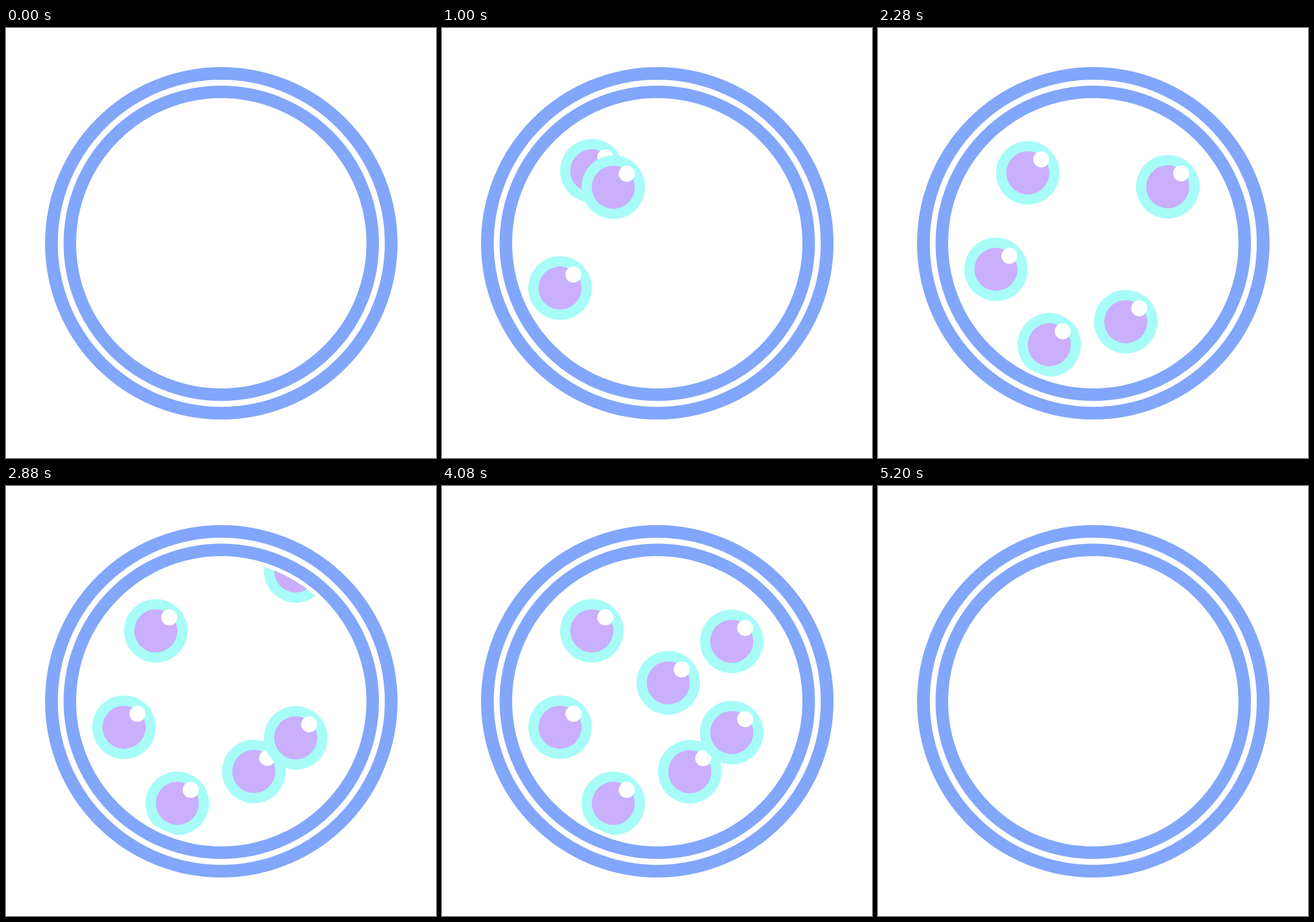
Animation, 748 px wide and 748 px high, one loop 5.6 s. Source, as an HTML page:

```html
<!DOCTYPE html>
<html lang="en">
<head>
<meta charset="utf-8">
<title>Bouncing bubbles</title>
<style>
  html, body { margin: 0; width: 100%; height: 100%; overflow: hidden; background: #fff; }
  svg { display: block; width: 100vw; height: 100vh; }
</style>
</head>
<body>
<svg viewBox="0 0 748 748">
  <defs>
    <clipPath id="dish"><circle cx="374.5" cy="374.5" r="245.5"/></clipPath>
    <g id="bubble">
      <circle r="55.3" fill="#a7fcf7"/>
      <circle r="37.5" fill="#caaffc"/>
      <circle cx="23.4" cy="-23.4" r="14" fill="#fff"/>
    </g>
  </defs>
  <g fill="none" stroke="#82a6fa">
    <circle cx="374.5" cy="374.5" r="295.5" stroke-width="22.2"/>
    <circle cx="374.5" cy="374.5" r="263.4" stroke-width="21.8"/>
  </g>
  <g id="bubbles" clip-path="url(#dish)"></g>
</svg>
<script>
  const LOOP = 5600, STEP = 40;
  const FIRST_LANDING = 240, STAGGER = 560, EXIT = 4640;
  const FALL = 0.764, EXIT_SPEED = 0.725; // px per ms

  // resting places, in order of arrival
  const rests = [
    [260.6, 252], [205.3, 419.7], [298, 552], [431, 497],
    [504, 429], [504, 270], [393.6, 341]
  ];

  const layer = document.getElementById('bubbles');
  const bubbles = rests.map(([x, y], i) => {
    const el = document.createElementNS('http://www.w3.org/2000/svg', 'use');
    el.setAttribute('href', '#bubble');
    layer.append(el);
    return { el, x, y, landing: FIRST_LANDING + i * STAGGER };
  });

  // linear fall, damped swing after landing, linear exit
  function offset(t, landing) {
    if (t >= EXIT) return (t - EXIT) * EXIT_SPEED;
    if (t < landing) return (t - landing) * FALL;
    const s = (t - landing) / 1000;
    return FALL * 100 * Math.sin(2 * Math.PI * s) * Math.exp(-4 * s);
  }

  function draw(ms) {
    const t = Math.floor((ms + 2) / STEP) * STEP % LOOP;
    for (const { el, x, y, landing } of bubbles) {
      el.setAttribute('transform', `translate(${x} ${(y + offset(t, landing)).toFixed(3)})`);
    }
  }

  const start = performance.now();
  function tick() {
    draw(performance.now() - start);
    requestAnimationFrame(tick);
  }
  tick();
</script>
</body>
</html>
```
